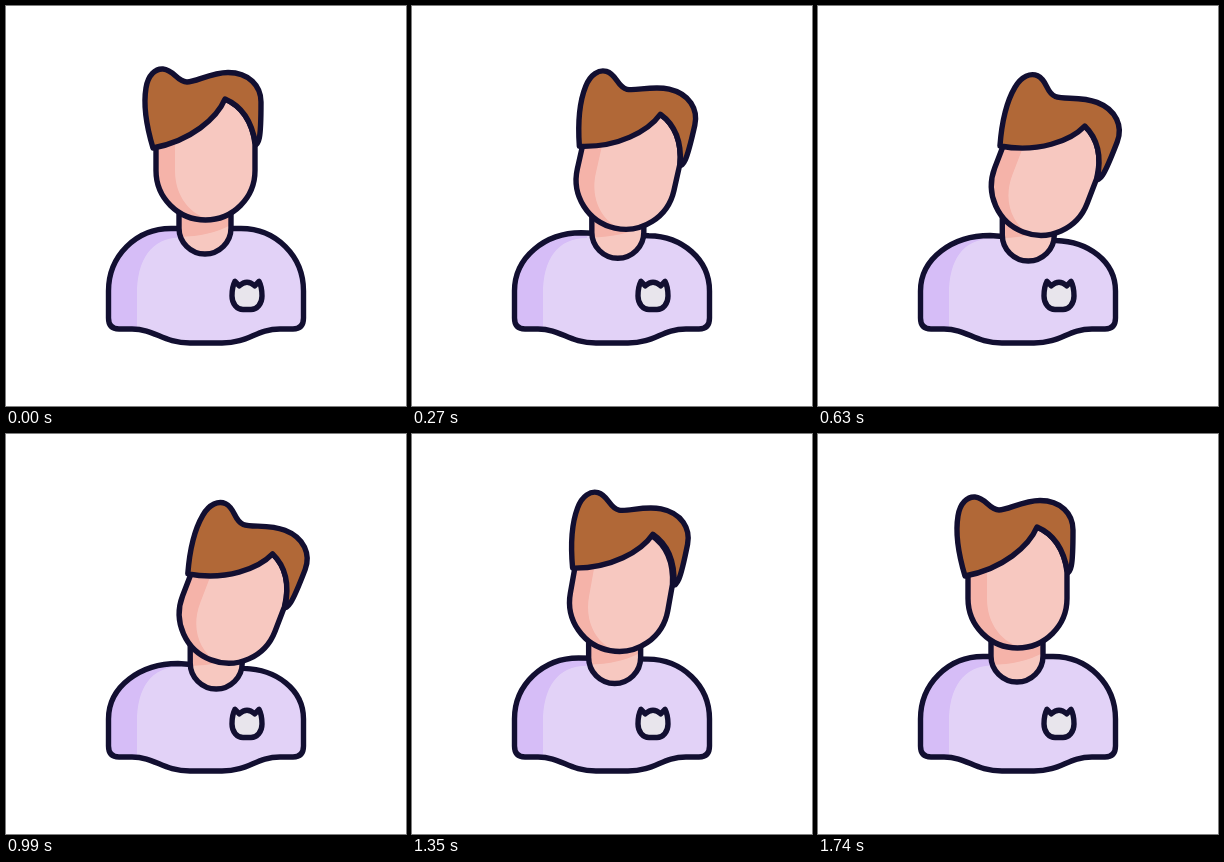
An HTML page that plays this animation: 400x400 px, repeating every 3.8 s.

```html
<!DOCTYPE html>
<html lang="en">
<head>
<meta charset="utf-8">
<title>Head tilt</title>
<style>
  html, body { margin: 0; width: 100%; height: 100%; overflow: hidden; background: #fff; }
  svg { display: block; width: 100vw; height: 100vh; }
  .line { stroke: #120f31; stroke-width: 5.4; stroke-linecap: round; stroke-linejoin: round; }
  .skin { fill: #f7c8c0; }
  .blush { fill: #f5b3a9; }
  .shirt { fill: #e2d2f7; }
  .fold { fill: #d6bdf7; }
  .hair { fill: #b16837; }
  .pocket { fill: #e8e5ec; }
  .open { fill: none; }
</style>
</head>
<body>
<svg viewBox="0 0 400 400">
  <defs>
    <path id="face" d="M150 138V164.5A49.5 49.5 0 0 0 249 164.5V138C247 122 240 102 219 93Z"/>
    <path id="throat" d="M173 198V222A26 26 0 0 0 225 222V198"/>
    <clipPath id="inFace"><use href="#face"/></clipPath>
    <clipPath id="inThroat"><use href="#throat"/></clipPath>
    <clipPath id="inShirt"><path class="torso"/></clipPath>
  </defs>

  <path class="torso shirt"/>
  <path id="fold" class="fold" clip-path="url(#inShirt)"/>
  <path class="torso line open"/>
  <path class="pocket line" d="M229 275.3C227 279 226 284 226 290C226 298 231 303.5 237 303.5H245C251 303.5 256 298 256 290C256 284 255 279 253 275.3L248.7 279.8Q241 272.8 233.3 279.8Z"/>

  <g id="neck">
    <use href="#throat" class="skin"/>
    <g clip-path="url(#inThroat)">
      <path id="shade" class="blush" d="M170 180H228V217Q206 231 170 231Z"/>
    </g>
    <use href="#throat" class="line open"/>
  </g>

  <g id="head">
    <use href="#face" class="skin"/>
    <path class="blush" clip-path="url(#inFace)" d="M145 90H169V164.5C169 190 184 210 207 214L199 220H145Z"/>
    <use href="#face" class="line open"/>
  </g>

  <path id="hair" class="hair line" d="M147 142C141 122 137 100 140 82C142 69 149.5 62.5 157 63C168 63.8 171 76 181 76C190 76 205 66.5 222 66.5C243 66.5 255 80 255 96C255 110 255 124 253.3 132C252.5 136 250 140 249.5 138C247 122 240 102 219 93C211 112 185 135 147 142Z"/>
</svg>
<script>
  const LOOP = 3800;
  const TILT = 21;
  const CHIN = [199.5, 164.5];

  const $ = id => document.getElementById(id);
  const torso = document.querySelectorAll('.torso');
  const clamp = x => Math.min(1, Math.max(0, x));

  // Cubic easing with handles (x1, 0) and (x2, 1)
  function ease(x, x1, x2) {
    let lo = 0, hi = 1;
    for (let i = 0; i < 24; i++) {
      const s = (lo + hi) / 2, r = 1 - s;
      if (3 * x1 * s * r * r + 3 * x2 * s * s * r + s ** 3 < x) lo = s;
      else hi = s;
    }
    return lo * lo * (3 - 2 * lo);
  }

  const span = (t, from, to) => clamp((t - from) / (to - from));
  const sharp = x => ease(x, 1 / 3, 1 / 3);
  const soft = x => ease(x, 1 / 3, 2 / 3);

  function place(id, x, y, turn = 0) {
    $(id).setAttribute('transform', `translate(${x} ${y}) rotate(${turn} ${CHIN})`);
  }

  function drawShirt(k) {
    const left = 222.5 + 7 * k, right = 222.5 + 12 * k;
    const d = `M102.5 285V312Q102.5 323 113 323H126C149 323 157 337 184 337H216` +
      `C243 337 250 323 274 323H287Q297.5 323 297.5 312V285` +
      `C297.5 ${250 + 5 * k} 270 ${right + k} ${235 + 3 * k} ${right}` +
      `L${165 + 7 * k} ${left}C${130 + 5 * k} ${left} 102.5 ${250 + 2 * k} 102.5 285Z`;
    torso.forEach(p => p.setAttribute('d', d));
    $('fold').setAttribute('d',
      `M95 340H131V288C131 254 145 ${231.5 + k} 175 ${231.5 + k}V200H95Z`);
  }

  function draw(t) {
    const lean = sharp(span(t, 0, 630));
    const shift = lean - soft(span(t, 960, 1590));
    const turn = TILT * (lean - sharp(span(t, 1110, 1740)));
    const lift = Math.sin(Math.PI * span(t, 960, 1740)) ** 2;
    const drop = shift - 0.1 * lift;
    const dx = 23.4 * shift, dy = 15.3 * drop;

    drawShirt(drop);
    place('neck', 11.3 * shift, 7 * drop);
    place('shade', 0, -6 * shift);
    place('head', dx, dy, turn);
    place('hair', dx + 0.6 * lift, dy - 1.4 * lift, turn + 1.2 * lift);
  }

  const start = performance.now();
  function tick() {
    draw((performance.now() - start) % LOOP);
    requestAnimationFrame(tick);
  }
  draw(0);
  requestAnimationFrame(tick);
</script>
</body>
</html>
```
